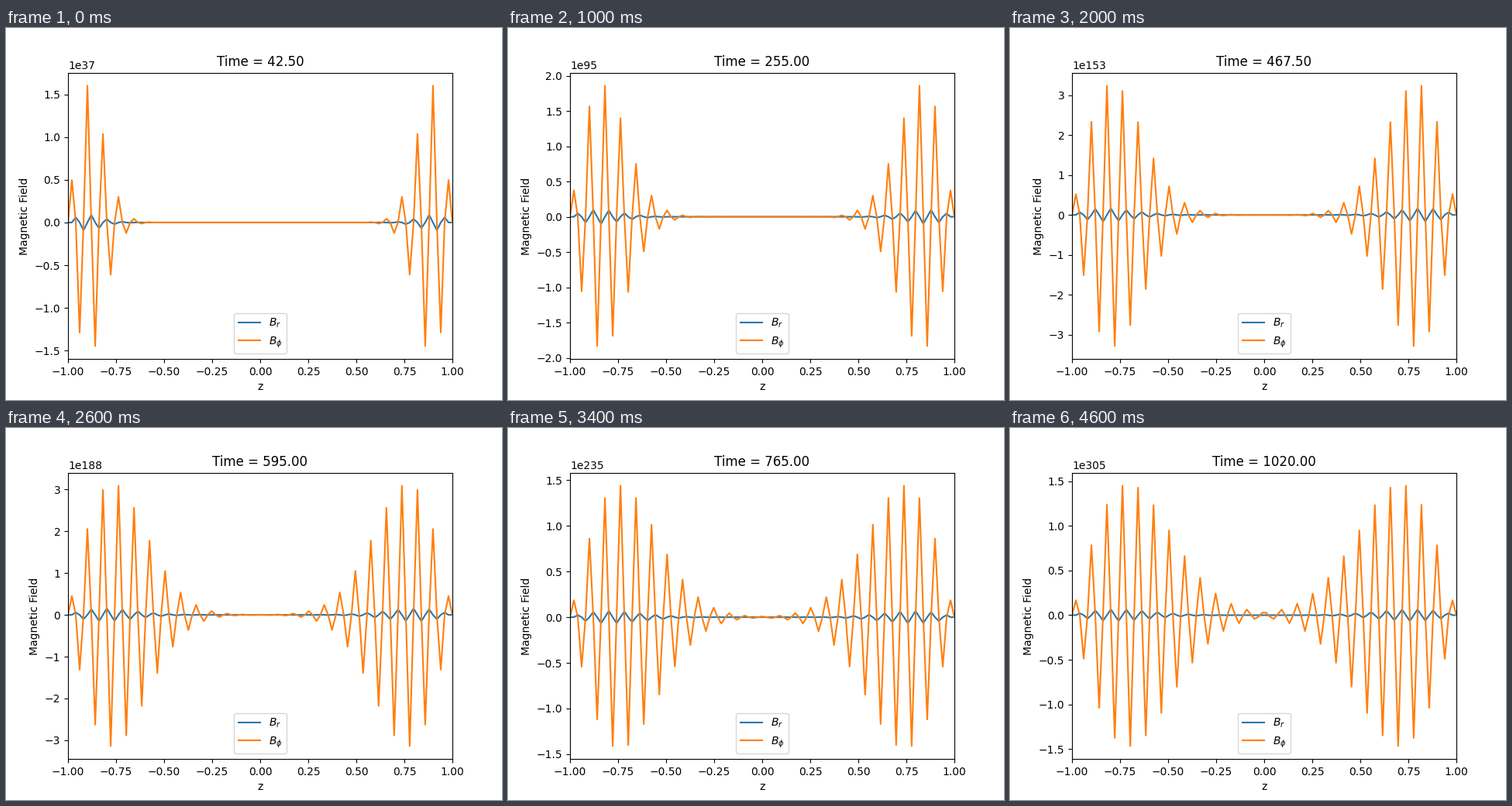
Animation of 640 by 480 pixels, one loop 4800 ms. Source, as a matplotlib script:

```python
import numpy as np
import matplotlib.pyplot as plt
from matplotlib.animation import FuncAnimation

FRAMES = 24
INTERVAL = 200
STEP = 42.5
POINTS = 100

z = np.linspace(-1, 1, POINTS)
depth = z + 1                       # distance from the left wall
cell = np.arange(POINTS) % 4
phi_wave = np.array([0, 1, 0, -1])[cell]
r_wave = np.array([-1, 0, 1, 0])[cell]
r_ratio = 0.068 * np.clip(-z, 0, 1) ** 1.4


def mirror(field):
    return field + field[::-1]


def fields(n):
    """Wave packets growing at both walls while they diffuse inward."""
    var = 0.0079 + 0.00327 * n
    bend = ((n - 12.5) / 11.5) ** 4
    log_amp = 23.797 + 11.6891 * n - 0.015 * bend - 1.5 * np.log10(var)
    packet = 10 ** log_amp * depth * np.exp(-depth ** 2 / (2 * var))
    return mirror(packet * r_ratio * r_wave), mirror(packet * phi_wave)


fig, ax = plt.subplots(figsize=(6.4, 4.8), dpi=100)


def draw(i):
    n = i + 1
    b_r, b_phi = fields(n)
    ax.clear()
    ax.plot(z, b_r, label=r"$B_r$")
    ax.plot(z, b_phi, label=r"$B_\phi$")
    ax.set_xlim(-1, 1)
    ax.set_xlabel("z")
    ax.set_ylabel("Magnetic Field")
    ax.set_title(f"Time = {STEP * n:.2f}")
    ax.legend(loc="lower center")
    return ax.lines


anim = FuncAnimation(fig, draw, frames=FRAMES, init_func=lambda: [],
                     interval=INTERVAL, repeat=True, repeat_delay=0)
plt.show()
```
